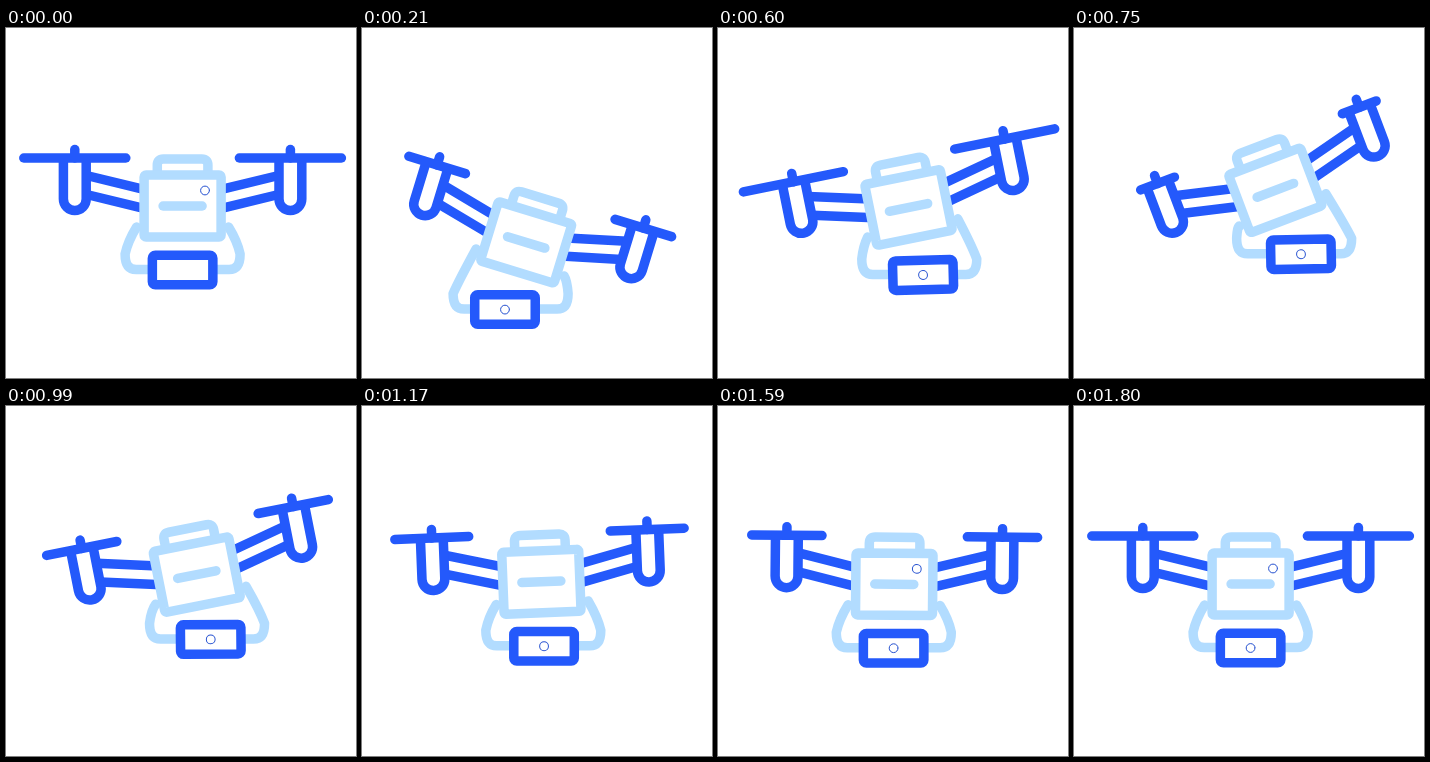
An HTML page with a canvas that plays this animation: 350 px wide and 350 px high, repeating every 1940 ms.

```html
<!DOCTYPE html>
<html lang="en">
<head>
<meta charset="utf-8">
<title>Drone</title>
<style>
  html, body { margin: 0; width: 100%; height: 100%; overflow: hidden; background: #fff; }
  canvas { display: block; width: 350px; height: 350px; }
</style>
</head>
<body>
<canvas id="stage" width="350" height="350"></canvas>
<script>
const ctx = document.getElementById('stage').getContext('2d');
const LOOP = 1940, STEP = 30, REST = 1800;
const BLUE = '#2459fb', PALE = '#b2dcff', WIDTH = 9.5;

// time, body x, body y, tilt, camera lag x, camera lag y, camera tilt
const POSES = [
  [0, 176.6, 178, 0, 0, 0, 0],
  [210, 164.2, 214.4, 17, -2.5, 6, 0],
  [450, 177.2, 195.6, 3.6, 0, 5.5, -1.5],
  [570, 188, 183, -9, 1.5, 5, -1.5],
  [760, 201.5, 161.9, -20.8, 3, 4, -1],
  [990, 190.8, 168.6, -11.2, 1.5, 2, -0.5],
  [1110, 182.5, 173.5, -5, 0.6, 1, 0],
  [1260, 176, 178.5, 1, -0.4, 0, 0],
  [1410, 175.2, 179, 2.1, -0.6, 0, 0],
  [1620, 176.4, 178.1, 0.3, 0, 0, 0],
  [REST, 176.6, 178, 0, 0, 0, 0]
];
// moments when the blades face the viewer
const PEAKS = [0, 300, 600, 925, 1230, 1530, REST];

function slope(i, c) {
  if (i === 0 || i === POSES.length - 1) return 0;
  const a = POSES[i - 1], b = POSES[i + 1];
  return (b[c] - a[c]) / (b[0] - a[0]);
}

function poseAt(t) {
  let i = 0;
  while (i < POSES.length - 2 && t >= POSES[i + 1][0]) i++;
  const a = POSES[i], b = POSES[i + 1], d = b[0] - a[0];
  const u = (t - a[0]) / d, v = 1 - u;
  const mix = c => v * v * (1 + 2 * u) * a[c] + u * u * (3 - 2 * u) * b[c]
    + d * u * v * (v * slope(i, c) - u * slope(i + 1, c));
  const [x, y, tilt, dx, dy, camTilt] = [1, 2, 3, 4, 5, 6].map(mix);
  return { x, y, tilt, dx, dy, camTilt };
}

function bladeScale(t) {
  let i = 0;
  while (i < PEAKS.length - 2 && t >= PEAKS[i + 1]) i++;
  const u = (t - PEAKS[i]) / (PEAKS[i + 1] - PEAKS[i]);
  return 0.3 + 0.7 * Math.abs(2 * u - 1);
}

const rad = deg => deg * Math.PI / 180;

function fromBody(p, x, y) {
  const c = Math.cos(rad(p.tilt)), s = Math.sin(rad(p.tilt));
  return { x: p.x + x * c - y * s, y: p.y + x * s + y * c };
}

function line(x1, y1, x2, y2) {
  ctx.beginPath();
  ctx.moveTo(x1, y1);
  ctx.lineTo(x2, y2);
  ctx.stroke();
}

function box(w, h, r) {
  ctx.beginPath();
  ctx.roundRect(-w / 2, -h / 2, w, h, r);
  ctx.fill();
  ctx.stroke();
}

function ring(x, y) {
  ctx.save();
  ctx.strokeStyle = '#2450d0';
  ctx.lineWidth = 1;
  ctx.beginPath();
  ctx.arc(x, y, 4.4, 0, 7);
  ctx.stroke();
  ctx.restore();
}

function at(x, y, deg, draw) {
  ctx.save();
  ctx.translate(x, y);
  ctx.rotate(rad(deg));
  draw();
  ctx.restore();
}

function cable(p, cam, side) {
  const a = fromBody(p, side * 46, 21);
  const bx = cam.x + side * 57.5 + p.tilt * 0.33, by = cam.y - 16;
  const end = cam.y - 0.5;
  ctx.beginPath();
  ctx.moveTo(a.x, a.y);
  ctx.quadraticCurveTo(bx + (a.x - bx) * 0.25, by - 13, bx, by);
  ctx.bezierCurveTo(bx, by + 10, bx - side * 3, end, bx - side * 11, end);
  ctx.lineTo(cam.x + side * 33, end);
  ctx.stroke();
}

function wing(side, scale) {
  ctx.save();
  ctx.scale(side, 1);
  line(96, -30.5, 42, -17.3);
  line(96, -11.5, 42, 1.7);
  ctx.translate(107.8, 0);
  ctx.beginPath();
  ctx.moveTo(-11.4, -46);
  ctx.lineTo(-11.4, -7);
  ctx.arc(0, -7, 11.4, Math.PI, 0, true);
  ctx.lineTo(11.4, -46);
  ctx.fill();
  ctx.stroke();
  line(0, -56.5, 0, -48);
  line(-51 * scale, -48, 51 * scale, -48);
  ctx.restore();
}

function body(lit) {
  ctx.strokeStyle = PALE;
  ctx.beginPath();
  ctx.moveTo(-25.3, -31);
  ctx.lineTo(-25.3, -41);
  ctx.quadraticCurveTo(-25.3, -47, -19.3, -47);
  ctx.lineTo(19.3, -47);
  ctx.quadraticCurveTo(25.3, -47, 25.3, -41);
  ctx.lineTo(25.3, -31);
  ctx.stroke();
  box(77, 62, 2);
  line(-19.5, 0, 19.5, 0);
  if (lit) ring(22.4, -15.5);
}

function render(time) {
  const t = Math.floor(time % LOOP / STEP) * STEP;
  const now = Math.min(t, REST);
  const p = poseAt(now), scale = bladeScale(now);
  const cam = fromBody(p, 0, 64);
  cam.x += p.dx;
  cam.y += p.dy;

  ctx.fillStyle = '#fff';
  ctx.fillRect(0, 0, 350, 350);
  ctx.lineWidth = WIDTH;
  ctx.lineCap = ctx.lineJoin = 'round';

  ctx.strokeStyle = PALE;
  cable(p, cam, -1);
  cable(p, cam, 1);
  at(p.x, p.y, p.tilt, () => {
    ctx.strokeStyle = BLUE;
    wing(-1, scale);
    wing(1, scale);
    body(t < 90 || t >= 1290);
  });
  at(cam.x, cam.y, p.camTilt, () => {
    ctx.strokeStyle = BLUE;
    box(60.5, 29.5, 3);
    if (t >= STEP) ring(0, 0);
  });
}

const start = performance.now();
function tick() {
  render(performance.now() - start);
  requestAnimationFrame(tick);
}
tick();
</script>
</body>
</html>
```
